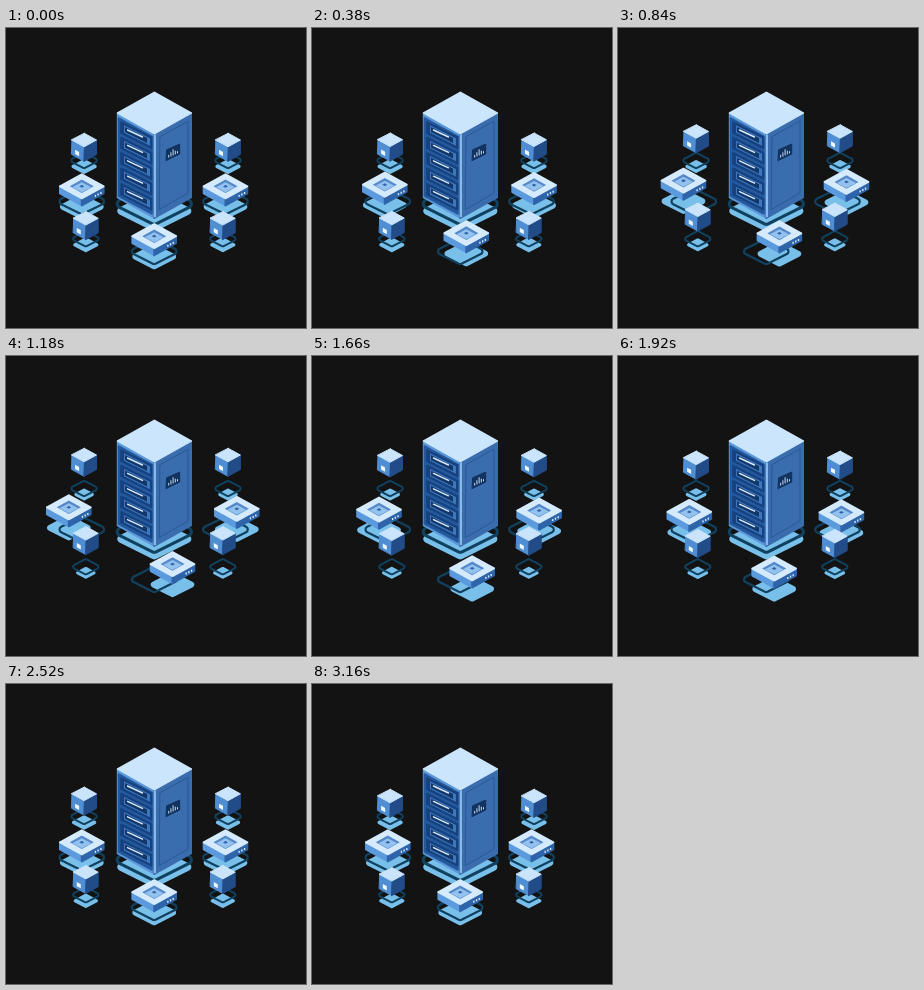
An HTML page with a canvas for the animation above (3600 ms loop, 300 by 300 pixels).

```html
<!DOCTYPE html>
<html>
<head>
<meta charset="utf-8">
<style>
  html, body { margin: 0; width: 100%; height: 100%; overflow: hidden; background: #131313; }
  canvas { display: block; width: 300px; height: 300px; }
</style>
</head>
<body>
<canvas id="stage" width="300" height="300"></canvas>
<script>
const LOOP = 3600;
const BG = '#131313', LIGHT = '#78bfea', RING = '#10415f';
const ctx = document.getElementById('stage').getContext('2d');
ctx.lineJoin = ctx.lineCap = 'round';

const ease = (t, from, to) => {
  const k = Math.min(1, Math.max(0, (t - from) / (to - from)));
  return (1 - Math.cos(Math.PI * k)) / 2;
};
const swing = (t, a, b, c, d) => ease(t, a, b) - ease(t, c, d);

function trace(points, closed = true) {
  ctx.beginPath();
  points.forEach(([x, y]) => ctx.lineTo(x, y));
  if (closed) ctx.closePath();
}

// Closed path whose corners are rounded inwards.
function traceRound(points, radius) {
  const [a, b] = [points[0], points.at(-1)];
  ctx.beginPath();
  ctx.moveTo((a[0] + b[0]) / 2, (a[1] + b[1]) / 2);
  points.forEach((p, i) => ctx.arcTo(...p, ...points[(i + 1) % points.length], radius));
  ctx.closePath();
}

// Filled polygon; a positive radius rounds the corners outwards.
function poly(points, color, radius = 0) {
  trace(points);
  ctx.fillStyle = ctx.strokeStyle = color;
  ctx.fill();
  if (radius) {
    ctx.lineWidth = radius * 2;
    ctx.stroke();
  }
}

function line(points, color, width, closed = false) {
  trace(points, closed);
  ctx.strokeStyle = color;
  ctx.lineWidth = width;
  ctx.stroke();
}

const diamond = (x, y, w, h) => [[x, y - h], [x + w, y], [x, y + h], [x - w, y]];

function plate(x, y, w, h, radius) {
  traceRound(diamond(x, y, w, h), radius);
  ctx.fillStyle = LIGHT;
  ctx.fill();
}

function ring(x, y, w, h, radius, width) {
  traceRound(diamond(x, y, w, h), radius);
  ctx.strokeStyle = RING;
  ctx.lineWidth = width;
  ctx.stroke();
}

// Box seen from above: (x, y) is the centre of its top face.
function box(x, y, w, h, depth, top, left, right, radius) {
  poly([[x - w, y], [x, y + h], [x, y + h + depth], [x - w, y + depth]], left, radius);
  poly([[x, y + h], [x + w, y], [x + w, y + depth], [x, y + h + depth]], right, radius);
  poly(diamond(x, y, w, h), top, radius);
}

function cube(x, y, lift) {
  const k = 1 - 0.2 * lift;
  plate(x, y + 26.5, 14.5 * k, 7.6 * k, 1.6);
  ring(x, y + 20.5, 15, 7.8, 2, 2);
  y -= 13 * lift;
  box(x, y, 12.4, 6.8, 14.5, '#c9e4fb', '#4f8ed3', '#224c88', 0.5);
  poly([[x - 9, y + 9.8], [x - 5, y + 12], [x - 5, y + 16.2], [x - 9, y + 14]], '#eef7ff');
}

function router(x, y, dx, dy) {
  plate(x + dx, y + dy + 20.5, 25.5, 13, 3);
  ring(x, y + 15.2, 26, 13, 3, 2.2);
  x += dx;
  y += dy;
  box(x, y, 21.8, 12, 7, '#d5ebfd', '#5c9ade', '#2e64a9', 1);
  poly(diamond(x, y, 12, 6.8), '#5588c8');
  poly(diamond(x, y + 1, 9.5, 5), '#94c2ee');
  poly(diamond(x, y, 2.4, 1.4), '#2d61a5');
  for (let i = 0; i < 3; i++) {
    ctx.fillStyle = '#e4f2ff';
    ctx.fillRect(x + 13 + i * 2.7, y + 8.5 - i * 1.4, 1.3, 2);
  }
}

function slot(y) {
  const band = (x1, x2, top, height) => {
    const at = x => y + top + (x - 115) * 0.5;
    return [[x1, at(x1)], [x2, at(x2)], [x2, at(x2) + height], [x1, at(x1) + height]];
  };
  poly(band(115, 145.5, 0, 11), '#17427f', 0.8);
  poly(band(118, 144, 1.8, 7.5), '#3d77bd');
  poly(band(119, 141, 3, 5), '#143769');
  line([[121.5, y + 8], [136.5, y + 15]], '#d9edff', 1.4);
}

function server() {
  plate(148.3, 183, 42, 21, 4);
  ring(148.3, 175.8, 42, 21, 4, 3);
  box(148.4, 85, 36.6, 20.5, 84.5, '#cbe6fc', '#5c98d8', '#3a6dad', 1);
  poly([[112.5, 90], [146, 108.5], [146, 186], [112.5, 168]], '#25599e', 0.8);
  for (let i = 0; i < 5; i++) slot(94 + i * 15.4);
  line([[149, 107], [149, 188.5]], '#9fcdf4', 1.6);
  line([[153.5, 109], [182, 93], [182, 165], [153.5, 181.5]], '#285994', 1, true);
  poly([[160.3, 122], [173.7, 116], [173.7, 126], [160.3, 132.5]], '#12325f', 0.5);
  [2, 3.5, 5.5, 3, 1.5].forEach((h, i) => {
    const x = 162.7 + i * 2.2, y = 129.3 - i * 1.05;
    line([[x, y], [x, y - h]], '#d9edff', 0.9);
  });
}

// Constant-speed walk around a diamond, one side every 600 ms.
function patrol(t) {
  const corners = [[0, 0], [9.6, -4.8], [18.6, 0], [10, 5.4], [0, 0]];
  const u = Math.min(t / 600, 3.9999);
  const i = Math.floor(u), k = u - i;
  return [0, 1].map(a => corners[i][a] + (corners[i + 1][a] - corners[i][a]) * k);
}

function draw(t) {
  ctx.fillStyle = BG;
  ctx.fillRect(0, 0, 300, 300);
  const slide = swing(t, 0, 1200, 1200, 2400);
  const lift = swing(t, 300, 1200, 1480, 2900);
  cube(78.1, 112, lift);
  cube(222, 112, lift);
  router(75.8, 158.3, -13 * slide, -7 * slide);
  router(219.5, 158.3, 11.3 * slide, -5.5 * slide);
  server();
  cube(79.8, 190.3, lift);
  cube(216.8, 190.3, lift);
  router(148.2, 208.2, ...patrol(t));
}

const start = performance.now();
function tick() {
  draw((performance.now() - start) % LOOP);
  requestAnimationFrame(tick);
}
tick();
</script>
</body>
</html>
```
